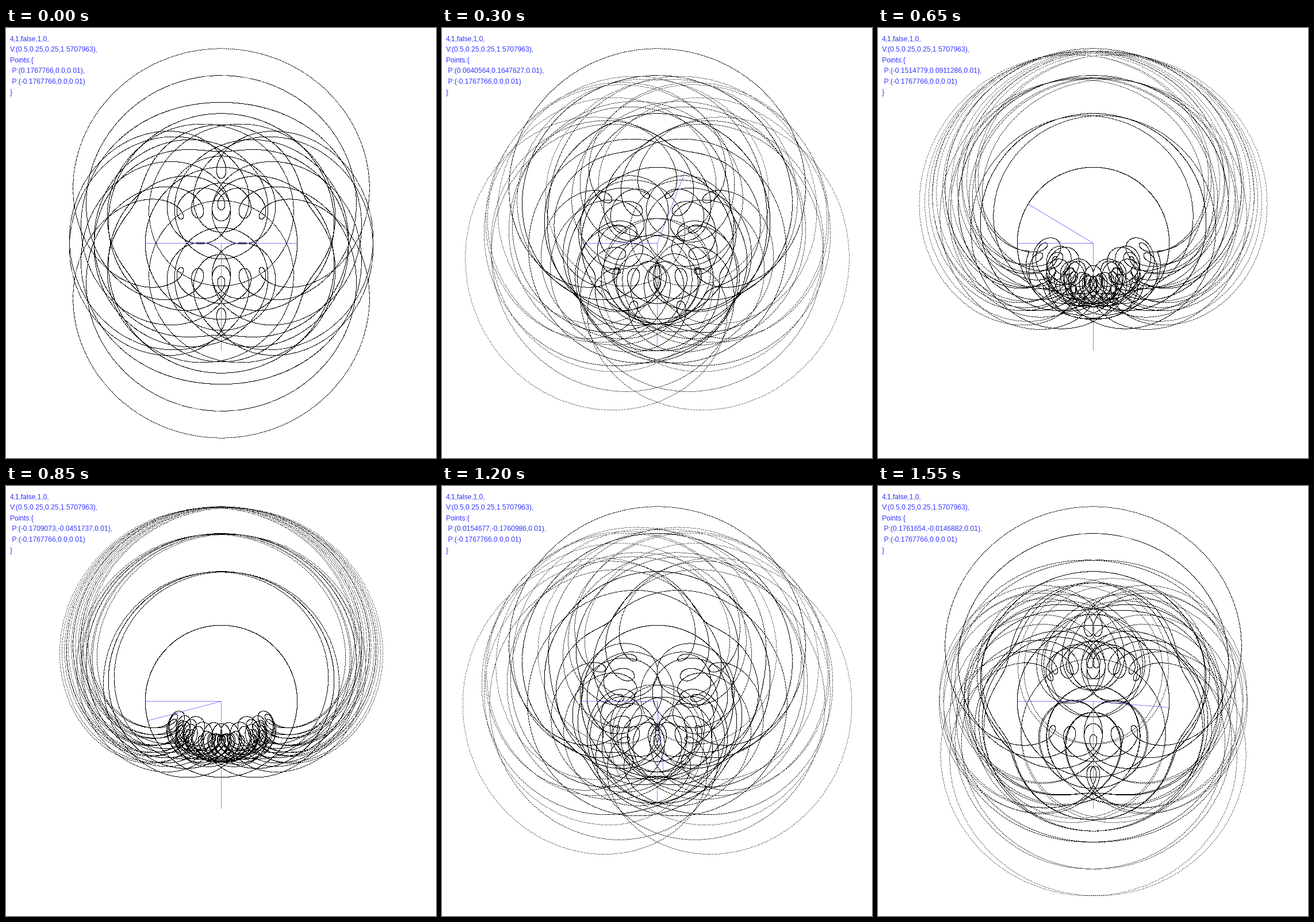
Animation, 748 px wide and 748 px high, one loop 1600 ms. Source, as a matplotlib script:

```python
import itertools
import math

import matplotlib.pyplot as plt
import numpy as np
from matplotlib.animation import FuncAnimation

SIZE = 748
DPI = 100
PX = 72 / DPI
FRAMES = 32
INTERVAL = 50
STEP = 0.2          # radians the first point turns per frame

LEVELS = 4
TRUNK = 0.25
REACH = TRUNK * math.sqrt(0.5)
RATIO = REACH / TRUNK
BLUE = "#3333ff"

spin = np.arange(0, 2 * np.pi, 0.004)
choices = np.array(list(itertools.product((0, 1), repeat=LEVELS)))
depth = np.arange(1, LEVELS + 1)


def to_stage(z):
    """Stage position of complex points measured from the trunk's tip."""
    return SIZE * (0.5 + np.real(z)), SIZE * (0.5 - np.imag(z))


def branch_paths(angles):
    """Joint positions of every branch while both points turn together."""
    turns = np.cumsum(np.asarray(angles)[choices] - np.pi / 2, axis=1)
    phase = turns[:, :, None] + depth[None, :, None] * spin
    arms = TRUNK * RATIO ** depth[None, :, None] * np.exp(1j * phase)
    return 1j * np.cumsum(arms, axis=1)


def picture(angle):
    """The paths as single dark pixels on white."""
    canvas = np.full((SIZE, SIZE), 255, np.uint8)
    x, y = to_stage(branch_paths((angle, np.pi)))
    canvas[np.rint(y).astype(int), np.rint(x).astype(int)] = 0
    return canvas


def arm_data(end):
    x, y = to_stage(np.array([0, end]))
    return x + 0.5, y + 0.5


def arm(end):
    return ax.plot(*arm_data(end), color=BLUE, lw=0.6 * PX, snap=False,
                   solid_capstyle="butt")[0]


def number(value):
    return str(math.trunc(value * 1e7) / 1e7)


def point_label(angle):
    x, y = REACH * math.cos(angle), REACH * math.sin(angle)
    return f" P:({number(x)},{number(y)},0.01),"


fig = plt.figure(figsize=(SIZE / DPI, SIZE / DPI), dpi=DPI, facecolor="white")
ax = fig.add_axes([0, 0, 1, 1])
ax.axis("off")
image = ax.imshow(picture(0), extent=(0, SIZE, SIZE, 0), cmap="gray",
                  vmin=0, vmax=255, interpolation="nearest", aspect="auto")

arm(-1j * TRUNK)
arm(-REACH)
moving_arm = arm(REACH)
ax.set_xlim(0, SIZE)
ax.set_ylim(SIZE, 0)

lines = [
    "4,1,false,1,0,",
    "V:(0.5,0.25,0.25,1.5707963),",
    "Points:{",
    point_label(0),
    " P:(-0.1767766,0.0,0.01)",
    "}",
]
labels = [
    ax.text(7, round(22.3 + i * SIZE / 40), line, color=BLUE,
            family="Liberation Sans", size=12 * PX, va="baseline")
    for i, line in enumerate(lines)
]


def update(frame):
    angle = STEP * frame
    image.set_data(picture(angle))
    moving_arm.set_data(*arm_data(REACH * np.exp(1j * angle)))
    labels[3].set_text(point_label(angle))
    return image, moving_arm, labels[3]


anim = FuncAnimation(fig, update, frames=FRAMES, interval=INTERVAL,
                     repeat=True, repeat_delay=0)
plt.show()
```
